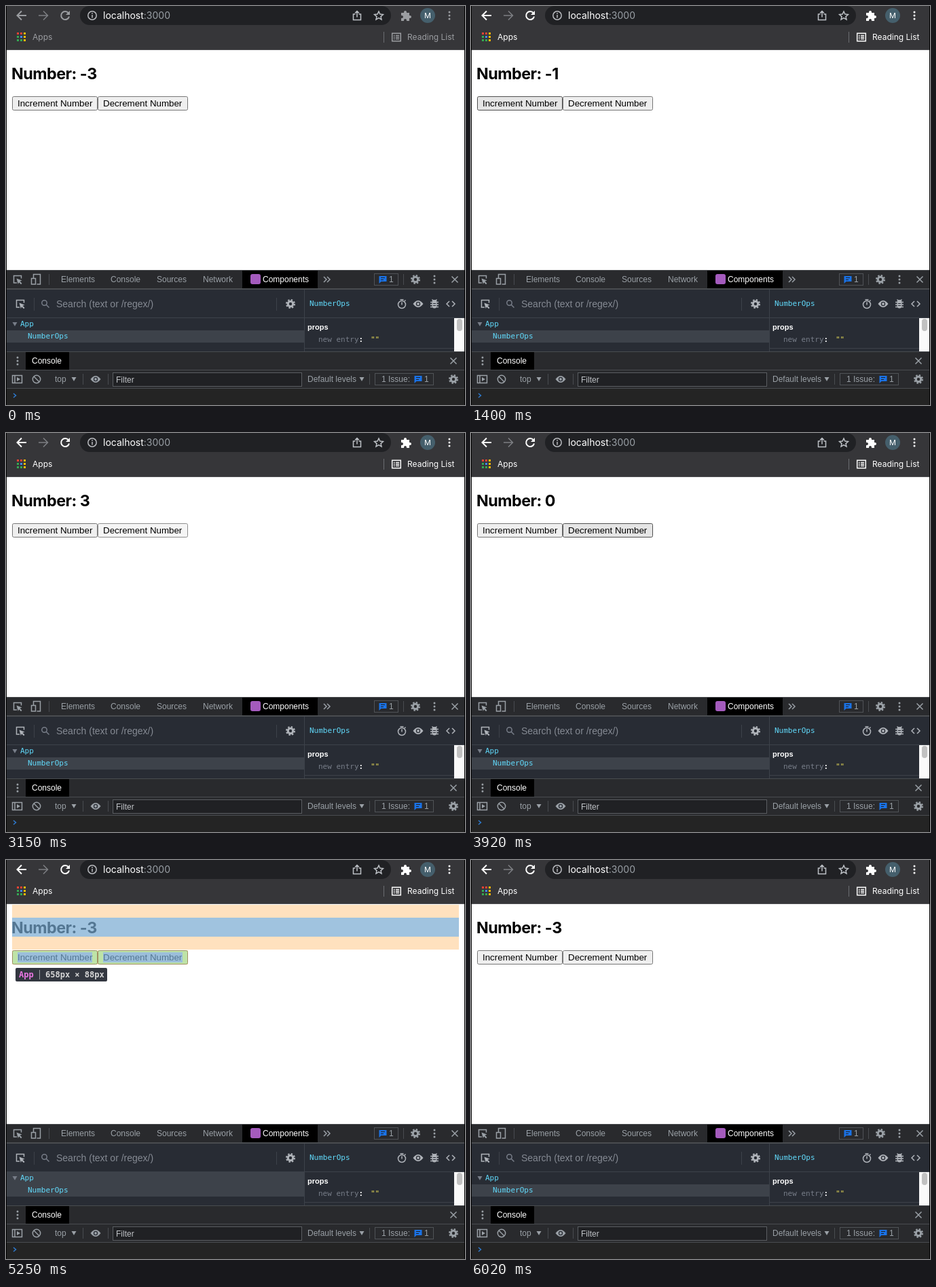
Write an HTML page that moves like this. It is 676 px wide and 588 px high and loops after 6090 ms.

```html
<!DOCTYPE html>
<html lang="en">
<head>
<meta charset="utf-8">
<title>Counter with developer tools</title>
<style>
html, body { margin: 0; width: 100%; height: 100%; overflow: hidden; background: #000; }
svg { display: block; width: 100%; height: 100%; --chrome: #9b9da1; }
svg.focused { --chrome: #fff; }
rect { shape-rendering: crispEdges; }
.round { shape-rendering: auto; }
text { font: 12px "Liberation Sans", Arial, sans-serif; white-space: pre; }
.ui text, .ui .url { font-family: Inter, sans-serif; }
.ui .url { font-size: 14px; }
.mono text, text.mono { font: 11px "DejaVu Sans Mono", monospace; }
.tip text { font: bold 12px "DejaVu Sans Mono", monospace; }
.chrome { fill: var(--chrome); }
.line { fill: none; stroke: currentColor; stroke-width: 1.5; }
.chromeLine { color: var(--chrome); stroke-width: 2; }
.heading { font: 700 23.3px Inter, sans-serif; letter-spacing: -.5px; }
.button rect { fill: #efefef; stroke: #767676; shape-rendering: auto; }
.button text { font-size: 13.333px; }
.button.hover rect { fill: #e5e5e5; stroke: #4f4f4f; }
.button.active rect { fill: #f5f5f5; stroke: #8d8d8d; }
.content { fill: rgba(120,170,210,.7); }
.margin { fill: rgba(255,155,40,.3); }
.padding { fill: rgba(77,200,0,.3); }
.border { fill: rgba(255,200,50,.3); }
[hidden] { display: none; }
</style>
</head>
<body>
<svg id="stage" viewBox="0 0 676 588">
  <defs>
    <g id="gear" fill="none" stroke="currentColor">
      <circle r="3.7" stroke-width="3"/>
      <circle r="5.9" stroke-width="2.2" stroke-dasharray="2.4 2.234"/>
    </g>
    <g id="dots" fill="currentColor"><circle cy="-5" r="1.5"/><circle r="1.5"/><circle cy="5" r="1.5"/></g>
    <path id="close" class="line" d="M-4.5-4.5l9 9M4.5-4.5l-9 9"/>
    <path id="chat" fill="#1a73e8" d="M-5.500-5h11v8h-8l-3 3z"/>
    <path id="chatLines" stroke="#202124" d="M-3-2.500h6M-3 .500h4"/>
    <g id="inspect">
      <path class="line" stroke-width="1.300" d="M-1 5h-4.500v-10.500h11v4"/>
      <path fill="currentColor" d="M-1.500-1.500l8 3-3 1.300 3 3-1.400 1.400-3-3-1.300 2.800z"/>
    </g>
    <g id="eye">
      <path fill="currentColor" d="M-7.500 0Q0-10 7.500 0Q0 10-7.500 0"/>
      <circle r="3.200" fill="#282c34"/><circle r="1.900" fill="currentColor"/>
    </g>
    <path id="down" fill="currentColor" d="M-3.500-3h7l-3.500 6z"/>
  </defs>

  <!-- browser bars -->
  <g class="ui">
    <rect x="1" width="674" height="65" fill="#363639"/>
    <rect x="1" y="64" width="674" height="1" fill="#505154"/>
    <path fill="#202124" d="M109 14a14 14 0 0 1 14-14h430a14 14 0 0 1 0 28h-430a14 14 0 0 1-14-14"/>
    <path class="line chromeLine" d="M30 14h-13M23 7.500l-6.500 6.500 6.500 6.500"/>
    <path class="line" color="#7d7f83" d="M48 14h13M55 7.500l6.500 6.500-6.500 6.500"/>
    <path class="line chromeLine" d="M92 10.500a6 6 0 1 0 1 5"/>
    <path class="chrome" d="M94 7v6h-6z"/>
    <g color="#b9bbbf"><circle class="line" cx="127" cy="14" r="6.200"/><path class="line" d="M127 13v4.500M127 10v1.700"/></g>
    <text class="url" x="143" y="19" fill="#fff">localhost<tspan fill="#9aa0a6">:3000</tspan></text>
    <g class="line" color="#bdc1c6">
      <path d="M514.500 12h-3v8.500h11v-8.500h-3M517 16.500v-8M514 10.500l3-3 3 3"/>
      <path d="M549 8l1.900 4.100 4.500.5-3.400 3 1 4.400-4-2.300-4 2.300 1-4.400-3.400-3 4.500-.5z"/>
    </g>
    <path class="chrome" d="M582 10h4v-1a2 2 0 0 1 4 0v1h4v4h1a2 2 0 0 1 0 4h-1v4h-4v-1a2 2 0 0 0-4 0v1h-4v-4h1a2 2 0 0 0 0-4h-1z"/>
    <circle cx="621" cy="14" r="11" fill="#455f6c"/>
    <text x="621" y="18" text-anchor="middle" fill="#fff" style="font-size:11px">M</text>
    <use href="#dots" x="653" y="14" class="chromeLine"/>
    <g id="appGrid"></g>
    <text class="chrome" x="39" y="50" font-weight="500">Apps</text>
    <rect x="556" y="38" width="1" height="16" fill="#6b6d71"/>
    <g class="chromeLine">
      <path class="line" d="M568.700 40.200h12.600v11.600h-12.600z"/>
      <path class="line" d="M571 43.500h1.500M571 46h1.500M571 48.500h1.500M574 43.500h5M574 46h5M574 48.500h5" style="stroke-width:1.300"/>
    </g>
    <text class="chrome" x="591" y="50">Reading List</text>
  </g>

  <!-- page -->
  <rect x="1" y="65" width="674" height="324" fill="#fff"/>
  <text id="heading" class="heading" x="8" y="108"></text>
  <g id="increment" class="button">
    <rect x="9.500" y="133.500" width="125" height="20" rx="2"/><text x="17" y="148">Increment Number</text>
  </g>
  <g id="decrement" class="button">
    <rect x="135.500" y="133.500" width="132" height="20" rx="2"/><text x="143" y="148">Decrement Number</text>
  </g>
  <g id="overlay" hidden>
    <path class="margin" d="M9 66h658v19h-658zM9 113h658v19h-658z"/>
    <rect class="content" x="9" y="85" width="658" height="28"/>
    <g id="boxes"></g>
    <g class="tip">
      <rect id="tipBox" class="round" x="14" y="159" height="20" rx="2" fill="#333740"/>
      <text x="19" y="173" fill="#ee78e6" id="tipName"></text>
      <g id="tipSize"><rect x="49" y="162" width="1" height="14" fill="#9a9da3"/><text x="58" y="173" fill="#d7d7d7">658px × 88px</text></g>
    </g>
  </g>

  <!-- developer tools tabs -->
  <rect x="1" y="389" width="674" height="28" fill="#292a2d"/>
  <rect x="1" y="389" width="674" height="1" fill="#47494d"/>
  <rect x="1" y="416" width="674" height="2" fill="#494c50"/>
  <rect id="networkHover" x="279" y="390" width="69" height="26" fill="#37383b" hidden/>
  <rect x="348" y="390" width="111" height="26" fill="#000"/>
  <g color="#9aa0a6" fill="#9aa0a6">
    <use href="#inspect" x="17" y="403"/>
    <path class="line" d="M40.500 401v-5.500h10v14.500h-5M37.500 401.500h6v8.500h-6z"/>
    <rect x="63" y="395" width="1" height="16" fill="#494c50"/>
    <text x="81" y="407">Elements</text>
    <text x="154" y="407">Console</text>
    <text x="222" y="407">Sources</text>
    <text x="290" y="407" id="network">Network</text>
    <rect class="round" x="360" y="395" width="15" height="15" rx="3" fill="#a45bbd"/>
    <text x="378" y="407" fill="#fff">Components</text>
    <path class="line" d="M468 399l4 4-4 4M473 399l4 4-4 4"/>
    <rect x="542.500" y="394.500" width="35" height="17" fill="none" stroke="#505357"/>
    <use href="#chat" x="555" y="403"/><use href="#chatLines" x="555" y="403"/>
    <text x="564" y="407">1</text>
    <rect x="585" y="395" width="1" height="16" fill="#494c50"/>
    <use href="#gear" x="603" y="403"/>
    <use href="#dots" x="631" y="403"/>
    <use href="#close" x="661" y="403"/>
  </g>

  <!-- component inspector -->
  <rect x="1" y="418" width="674" height="91" fill="#282c34"/>
  <g fill="#3d424a">
    <rect x="1" y="459" width="674" height="1"/>
    <rect x="439" y="418" width="1" height="91"/>
    <rect x="41" y="430" width="1" height="19"/>
    <rect x="398" y="430" width="1" height="19"/>
    <rect x="440" y="504" width="220" height="1"/>
    <rect id="appRow" x="1" y="460" width="438" height="18" hidden/>
    <rect x="1" y="478" width="438" height="18"/>
  </g>
  <g color="#afb3b9">
    <use href="#inspect" x="21" y="439"/>
    <g color="#777d88"><circle class="line" cx="56.500" cy="437.500" r="3.700"/><path class="line" d="M59 440l4.500 4.500"/></g>
    <text x="74" y="444" fill="#858a93" style="font-size:14px">Search (text or /regex/)</text>
    <use href="#gear" x="419" y="439"/>
    <g class="line"><circle cx="583" cy="440" r="5.500"/><path d="M580.500 432.800h5M583 436.500v4M587 435l1.500-1.500"/></g>
    <use href="#eye" x="607" y="439"/>
    <path fill="currentColor" d="M627.500 436a3.500 3 0 0 1 7 0v5a3.500 4.500 0 0 1-7 0z"/>
    <path class="line" d="M625 436.500h12M625 440h12M625 443.500h12M627.500 432.500l2 2M634.500 432.500l-2 2"/>
    <path stroke="#282c34" d="M629 438.500h4M629 441.500h4"/>
    <path class="line" d="M653 435l-4 4 4 4M657 435l4 4-4 4"/>
    <use href="#down" x="13" y="469" color="#777d88"/>
  </g>
  <g class="mono" fill="#61dafb">
    <text x="21" y="472">App</text>
    <text x="32" y="490">NumberOps</text>
    <text x="447" y="442">NumberOps</text>
    <text x="460" y="495" fill="#777d88">new entry<tspan fill="#fff" font-weight="bold">:</tspan></text>
    <text x="537" y="495" fill="#e8dc57" font-weight="bold">""</text>
  </g>
  <text x="444" y="477" fill="#fff" style="font-size:11px;font-weight:bold">props</text>
  <rect x="660" y="460" width="15" height="49" fill="#fafafa"/>
  <rect class="round" x="664" y="461" width="8" height="18" rx="4" fill="#c1c1c1"/>

  <!-- console drawer -->
  <rect x="1" y="509" width="674" height="55" fill="#292a2d"/>
  <g fill="#494c50">
    <rect x="1" y="509" width="674" height="1"/>
    <rect x="1" y="536" width="674" height="1"/>
    <rect x="1" y="563" width="674" height="1"/>
    <rect x="113" y="542" width="1" height="16"/>
    <rect x="150" y="542" width="1" height="16"/>
    <rect x="535" y="542" width="1" height="16"/>
  </g>
  <rect x="29" y="510" width="64" height="26" fill="#000"/>
  <text x="38" y="527" fill="#fff">Console</text>
  <rect x="1" y="564" width="674" height="24" fill="#242424"/>
  <g color="#9aa0a6" fill="#9aa0a6">
    <use href="#dots" x="17" y="523"/>
    <use href="#close" x="659" y="523"/>
    <path class="line" d="M9.500 544.500h14v11h-14zM13 544.500v11"/>
    <path d="M16 547l5 3-5 3z"/>
    <circle class="line" cx="45" cy="550" r="5.700"/><path class="line" d="M41 546l8 8"/>
    <text x="72" y="554">top</text><use href="#down" x="100" y="550"/>
    <use href="#eye" x="132" y="550"/>
    <rect x="157.500" y="540.500" width="278" height="20" fill="#202124" stroke="#5a5d61"/>
    <text x="162" y="555" fill="#c0c3c7">Filter</text>
    <text x="444" y="554">Default levels</text><use href="#down" x="524" y="550"/>
    <rect x="543.500" y="541.500" width="86" height="17" fill="none" stroke="#505357"/>
    <text x="553" y="554">1 Issue:</text>
    <use href="#chat" x="607" y="550"/><use href="#chatLines" x="607" y="550"/>
    <text x="616" y="554">1</text>
    <use href="#gear" x="659" y="550"/>
    <path class="line" color="#2f7bd0" d="M11 571l3.500 3-3.500 3"/>
  </g>
</svg>
<script>
const LOOP = 6090;
const $ = id => document.getElementById(id);

// Each click is [pressed, released]; the number changes on release.
const incrementClicks = [[1260, 1260], [1260, 1400], [1540, 1610], [1820, 1960], [2240, 2310], [2520, 2590]];
const decrementClicks = [[3150, 3290], [3500, 3640], [3850, 3920], [4200, 4340], [4550, 4620], [4970, 5040]];

const between = (t, [from, to]) => t >= from && t < to;
const finished = (t, clicks) => clicks.filter(click => t >= click[1]).length;

function setButton(id, t, hover, clicks) {
  const state = clicks.some(click => between(t, click)) ? "active" : between(t, hover) ? "hover" : "";
  $(id).setAttribute("class", "button " + state);
}

function show(id, visible) {
  $(id).toggleAttribute("hidden", !visible);
}

function setOverlay(name) {
  show("overlay", name);
  if (!name) return;
  const extra = (name.length - 3) * 7.224;
  $("tipName").textContent = name;
  $("tipBox").setAttribute("width", 135 + extra);
  $("tipSize").setAttribute("transform", `translate(${extra})`);
}

function render(t) {
  const number = -3 + finished(t, incrementClicks) - finished(t, decrementClicks);
  const onNetwork = between(t, [5180, 5250]);
  const onApp = between(t, [5250, 5320]);
  const onChild = between(t, [5320, 5390]);

  $("stage").classList.toggle("focused", t >= 980);
  $("heading").textContent = "Number: " + number;
  setButton("increment", t, [980, 2800], incrementClicks);
  setButton("decrement", t, [2800, 5110], decrementClicks);
  show("networkHover", onNetwork);
  $("network").style.fill = onNetwork ? "#fff" : "";
  show("appRow", onApp);
  setOverlay(onApp ? "App" : onChild ? "NumberOps" : "");
}

const gridColors = ["#ea4335", "#ea4335", "#fbbc04", "#34a853", "#4285f4", "#fbbc04", "#34a853", "#34a853", "#fbbc04"];
$("appGrid").innerHTML = gridColors.map((color, i) =>
  `<rect x="${16 + i % 3 * 5}" y="${39 + Math.floor(i / 3) * 5}" width="3" height="3" fill="${color}"/>`).join("");

const frame = (x, y, w, h, dx, dy) =>
  `M${x} ${y}h${w}v${h}h${-w}zM${x + dx} ${y + dy}h${w - 2 * dx}v${h - 2 * dy}h${2 * dx - w}z`;
$("boxes").innerHTML = [[9, 126], [135, 133]].map(([x, w]) => `
  <path class="border" fill-rule="evenodd" d="${frame(x, 133, w, 21, 1, 1)}"/>
  <path class="padding" fill-rule="evenodd" d="${frame(x + 1, 134, w - 2, 19, 7, 2)}"/>
  <rect class="content" x="${x + 8}" y="136" width="${w - 16}" height="15"/>`).join("");

const start = performance.now();
function tick() {
  render((performance.now() - start) % LOOP);
  requestAnimationFrame(tick);
}
tick();
</script>
</body>
</html>
```
